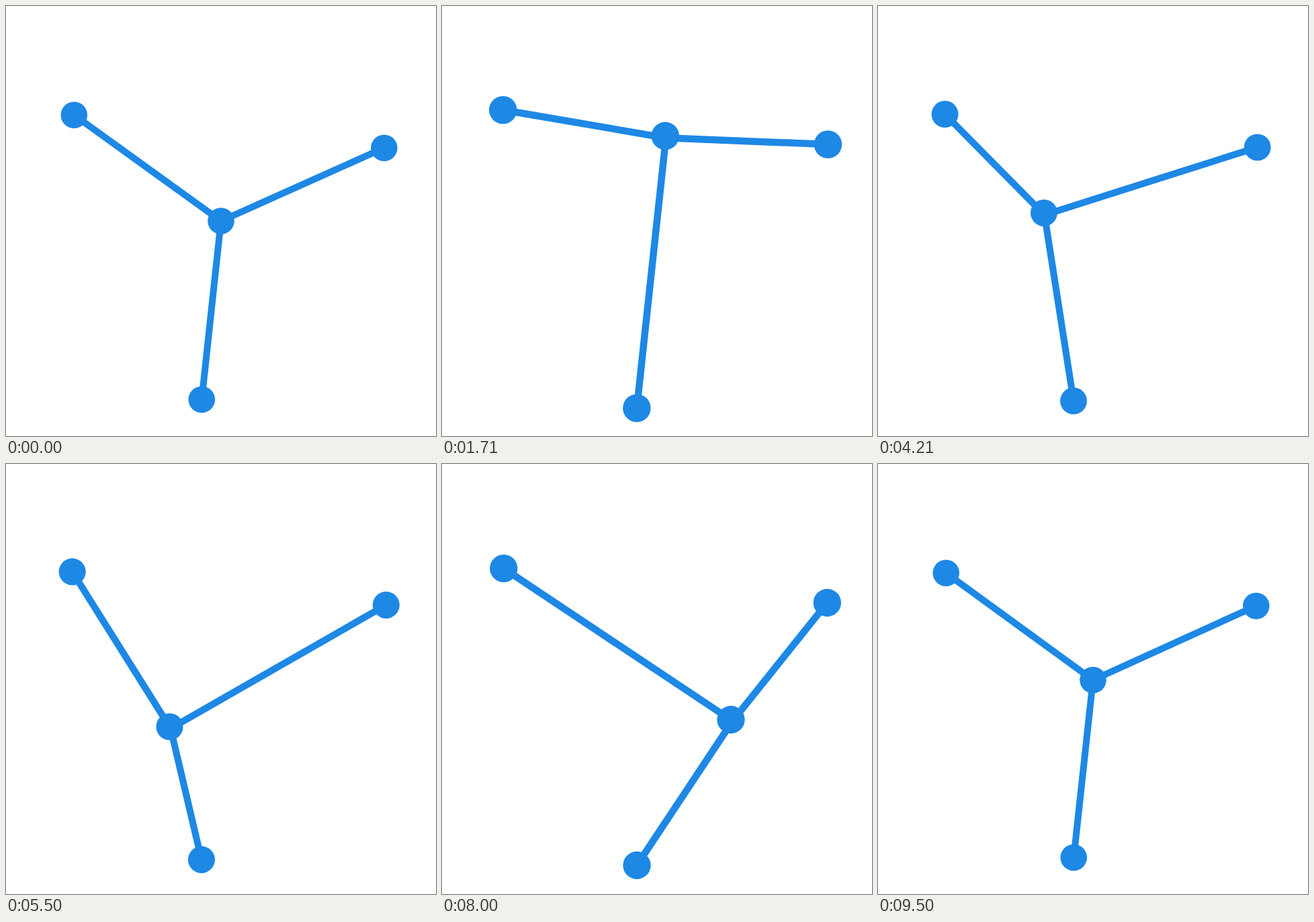
An HTML page for the animation above (9570 ms loop, 640 px wide and 640 px high).

```html
<!DOCTYPE html>
<html lang="en">
<head>
<meta charset="utf-8">
<title>Three arms</title>
<style>
  html, body { margin: 0; width: 100%; height: 100%; overflow: hidden; background: #fff; }
  svg { display: block; width: 100vw; height: 100vh; }
  line { stroke: #1e88e5; }
  circle { fill: #1e88e5; }
</style>
</head>
<body>
<svg viewBox="0 0 640 640"></svg>
<script>
const LOOP = 9570, STEPS = 134, FPS = 14;
const MID = 320, DOT = 19.8, STROKE = 10;

// Arm ends, measured from the middle of the stage.
const ENDS = [[242.8, -108.8], [-28.7, 265.7], [-218.7, -157.7]];

// Hub path: step, hub offset x/y, joint offset x/y (joint is where the arms meet).
const PATH = [
  [0, 0, 0, 0, 0],
  [24, 12.3, -126.7, 1, 3],
  [33.5, 0, -142, 1, 3],
  [46, -22.3, -85.5, 0.7, 3],
  [77, -76.5, 71, 1.5, 2.5],
  [94, 125.7, 78, 2.5, 1.5],
  [112, 110, 60.5, 2.5, 2],
  [STEPS, 0, 0, 0, 0]
];
// Fixed speeds per step where the hub sets off and where it rests.
const START = [0, 0.55, -1.3, 0, 0], REST = [0, 0, 0, 0, 0];

function tangent(k, c) {
  if (k === 0 || k === PATH.length - 1) return START[c];
  if (k === 2) return REST[c];
  const [a, b, d] = [PATH[k - 1], PATH[k], PATH[k + 1]];
  const h1 = b[0] - a[0], h2 = d[0] - b[0];
  return ((b[c] - a[c]) / h1 * h2 + (d[c] - b[c]) / h2 * h1) / (h1 + h2);
}

function along(step, c) {
  let k = 0;
  while (k < PATH.length - 2 && step >= PATH[k + 1][0]) k++;
  const a = PATH[k], b = PATH[k + 1], h = b[0] - a[0];
  const u = (step - a[0]) / h, v = 1 - u;
  return v * v * (1 + 2 * u) * a[c] + u * u * (3 - 2 * u) * b[c]
    + h * u * v * (v * tangent(k, c) - u * tangent(k + 1, c));
}

const svg = document.querySelector("svg");
function add(name) {
  return svg.appendChild(document.createElementNS("http://www.w3.org/2000/svg", name));
}
function set(el, attrs) {
  for (const key in attrs) el.setAttribute(key, attrs[key]);
}

const lines = ENDS.map(() => add("line"));
const dots = ENDS.map(() => add("circle"));
const hub = add("circle");

const stepStart = i => Math.round(i * 100 / FPS) * 10;

function draw(ms) {
  let step = Math.floor((ms + 5) * FPS / 1000);
  if (stepStart(step) > ms) step--;
  step = Math.min(step, STEPS - 1);

  const scale = 1 + 0.0295 * (1 - Math.cos(4 * Math.PI * step / STEPS));
  const r = DOT * scale;
  const x = MID + along(step, 1), y = MID + along(step, 2);
  const jx = x + along(step, 3), jy = y + along(step, 4);

  ENDS.forEach(([dx, dy], i) => {
    const ex = MID + dx * scale, ey = MID + dy * scale;
    set(lines[i], { x1: jx, y1: jy, x2: ex, y2: ey, "stroke-width": STROKE * scale });
    set(dots[i], { cx: ex, cy: ey, r });
  });
  set(hub, { cx: x, cy: y, r });
}

const began = performance.now();
function tick() {
  draw((performance.now() - began) % LOOP);
  requestAnimationFrame(tick);
}
tick();
</script>
</body>
</html>
```
